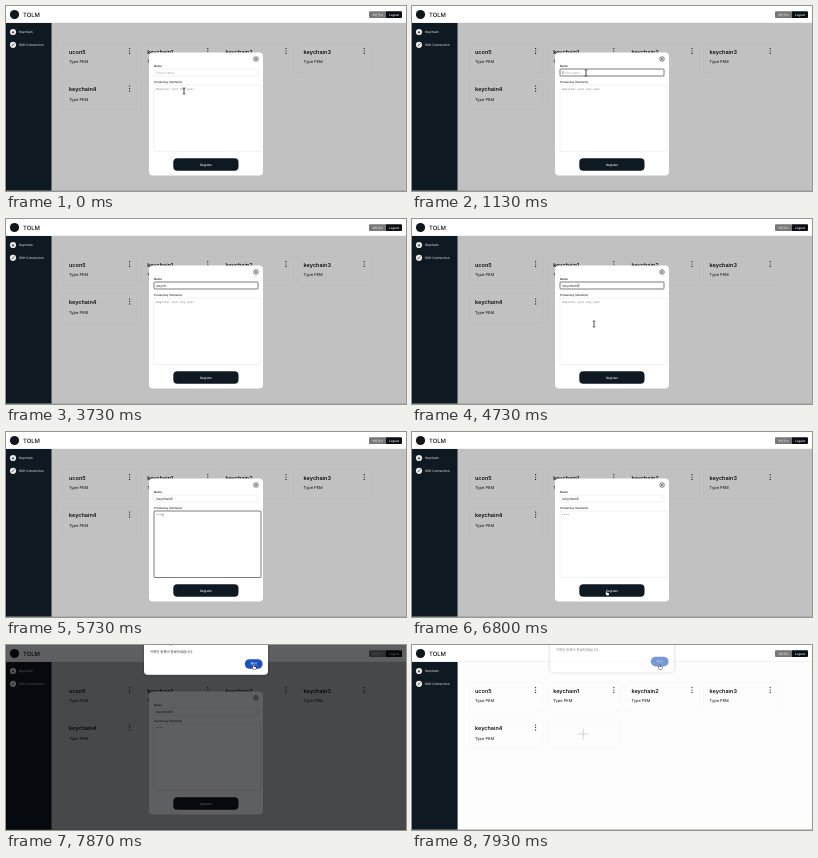
An HTML page with a canvas that plays this animation: 400 by 185 pixels, repeating every 8 s.

```html
<!DOCTYPE html>
<html lang="ko">
<head>
<meta charset="utf-8">
<title>Keychain registration</title>
<style>
  html, body { margin: 0; width: 100%; height: 100%; overflow: hidden; background: #fff; }
  canvas { display: block; width: 400px; height: 185px; }
</style>
</head>
<body>
<canvas id="stage"></canvas>
<script>
const LOOP = 8000, W = 400, H = 185;
const SANS = 'Inter, "Noto Sans CJK KR", "Noto Sans CJK", sans-serif';
const KOREAN = '"Noto Sans CJK KR", "Noto Sans CJK", sans-serif';
const MONO = '"Liberation Mono", monospace';
const NAVY = '#0f1922';

const canvas = document.getElementById('stage');
const ratio = window.devicePixelRatio || 1;
canvas.width = W * ratio;
canvas.height = H * ratio;
const ctx = canvas.getContext('2d');
ctx.scale(ratio, ratio);
ctx.textRendering = 'geometricPrecision';
ctx.textBaseline = 'middle';

const NAME = 'keychain5';
const NAME_TIMES = [1930, 2600, 3200, 3600, 3730, 3870, 4000, 4270, 4470];
const KEY_TIMES = [5470, 5560, 5640, 5730];
const NAME_FOCUS = [870, 4870], KEY_FOCUS = [4870, 6600];
const ALERT_IN = 6870, ALERT_OUT = 7930;

// Pointer moves: start, end, from, to
const MOVES = [
  [70, 870, [178, 85], [174, 67]],
  [4470, 4730, [174, 67], [182, 105]],
  [6200, 6600, [182, 105], [195, 161]],
  [6900, 7600, [195, 161], [248, 22]]
];

const within = (t, [from, to]) => t >= from && t < to;
const progress = (t, from, to) => Math.min(1, Math.max(0, (t - from) / (to - from)));
const ease = p => p * p * (3 - 2 * p);
const typed = (t, times) => times.filter(at => t >= at).length;

function rect(x, y, w, h, fill) {
  ctx.fillStyle = fill;
  ctx.fillRect(x, y, w, h);
}

function box(x, y, w, h, r, fill, stroke, width = 0.5) {
  ctx.beginPath();
  ctx.roundRect(x, y, w, h, r);
  if (fill) { ctx.fillStyle = fill; ctx.fill(); }
  if (stroke) { ctx.strokeStyle = stroke; ctx.lineWidth = width; ctx.stroke(); }
}

function circle(x, y, r, fill) {
  ctx.beginPath();
  ctx.arc(x, y, r, 0, 7);
  ctx.fillStyle = fill;
  ctx.fill();
}

function line(color, width, ...points) {
  ctx.beginPath();
  points.forEach(([x, y], i) => i ? ctx.lineTo(x, y) : ctx.moveTo(x, y));
  ctx.strokeStyle = color;
  ctx.lineWidth = width;
  ctx.stroke();
}

function text(str, x, y, size, color, { weight = 400, font = SANS, align = 'left' } = {}) {
  ctx.font = `${weight} ${size}px ${font}`;
  ctx.textAlign = align;
  ctx.fillStyle = color;
  ctx.fillText(str, x, y);
  return ctx.measureText(str).width;
}

function drawCard(title, col, row) {
  const x = 63 + col * 78.2, y = 46 + row * 37.5;
  box(x - 6, y - 8.5, 74, 29, 2, null, 'rgba(0,0,0,.03)');
  if (!title) {
    const cx = x + 30, cy = y + 5.5;
    line('#aaa', 0.5, [cx - 5.5, cy], [cx + 5.5, cy]);
    line('#aaa', 0.5, [cx, cy - 5.5], [cx, cy + 5.5]);
    return;
  }
  text(title, x, y, 5.5, '#111', { weight: 600 });
  text('Type PEM', x, y + 10, 4, '#111');
  for (const dy of [-3.4, -1, 1.4]) circle(x + 60.6, y + dy, 0.62, '#111');
}

function drawPage(modalOpen) {
  rect(0, 0, W, H, '#fdfdfd');
  ['ucon5', 'keychain1', 'keychain2', 'keychain3', 'keychain4', '']
    .forEach((title, i) => drawCard(title, i % 4, Math.floor(i / 4)));
  if (modalOpen) rect(45.6, 17, W - 45.6, H - 17, 'rgba(0,0,0,.24)');

  rect(0, 0, W, 17, '#fff');
  rect(0, 16.6, W, 0.4, '#ddd');
  circle(8.5, 8.5, 4.6, '#10161b');
  text('TOLM', 17, 8.8, 5.9, '#111', { weight: 500 });
  box(363, 5.3, 17, 6.6, [1, 0, 0, 1], '#777');
  box(380, 5.3, 16, 6.6, [0, 1, 1, 0], '#0b0f13');
  text('회원정보', 371.5, 8.6, 2.9, '#eee', { align: 'center', font: KOREAN });
  text('Logout', 388, 8.7, 3, '#fff', { align: 'center', weight: 500 });

  rect(0, 17, 45.6, H - 17, NAVY);
  ['Keychain', 'SSH Connection'].forEach((label, i) => {
    const y = 26 + i * 12.8;
    circle(7, y, 3.1, '#e8e8e8');
    if (i) line('#333', 0.8, [5.8, y + 1.2], [8.3, y - 1.3]);
    else box(5.9, y - 0.6, 2.2, 1.8, 0.3, '#555');
    text(label, 13, y, 3.2, '#f2f2f2');
  });
  rect(0, H - 0.5, W, 0.5, '#999');
}

function drawCaret(t, x, y) {
  if (t % 1060 < 530) line('#333', 0.35, [x, y - 1.8], [x, y + 1.8]);
}

function drawField(x, y, w, h, focused) {
  box(x, y, w, h, 0.8, '#fff', focused ? '#444' : '#e2e2e2', focused ? 0.7 : 0.5);
}

function drawModal(t) {
  box(143, 46.5, 114, 123, 4, '#fff');
  ctx.beginPath();
  ctx.arc(250, 53, 2.3, 0, 7);
  ctx.strokeStyle = '#222';
  ctx.lineWidth = 0.6;
  ctx.stroke();
  line('#222', 0.6, [249.1, 52.1], [250.9, 53.9]);
  line('#222', 0.6, [250.9, 52.1], [249.1, 53.9]);

  const nameFocus = within(t, NAME_FOCUS), keyFocus = within(t, KEY_FOCUS);
  const name = NAME.slice(0, typed(t, NAME_TIMES));
  text('Name', 148, 59.8, 2.8, '#111', { weight: 500 });
  drawField(148, 63, 104, 7, nameFocus);
  const nameWidth = name ? text(name, 150.5, 66.6, 3.4, '#222') : 0;
  if (!name && t < 1400) text('Enter name', 150.5, 66.6, 3.3, '#aaa');
  if (nameFocus) drawCaret(t, 150.7 + nameWidth, 66.5);

  const key = '*'.repeat(typed(t, KEY_TIMES));
  text('Private Key (Contents)', 148, 76, 2.65, '#111', { weight: 500 });
  drawField(148, 79, 107, 66.5, keyFocus);
  const keyWidth = key ? text(key, 150, 83.3, 2.9, '#222', { font: MONO }) : 0;
  if (!key) text('Register your key pair', 150, 83, 2.9, '#777', { font: MONO });
  if (keyFocus) drawCaret(t, 150 + keyWidth, 83);

  box(167.3, 152.2, 65.2, 12.6, 4, NAVY);
  text('Register', 200, 158.6, 3.05, '#fff', { align: 'center', weight: 500 });
}

// The shadow is clipped to the outside so a translucent sheet stays clean.
function drawSheet(x, y, w, h, r) {
  ctx.save();
  const outside = new Path2D();
  outside.rect(0, -H, W, 2 * H);
  outside.roundRect(x, y, w, h, r);
  ctx.clip(outside, 'evenodd');
  ctx.shadowColor = 'rgba(0,0,0,.35)';
  ctx.shadowBlur = 3 * ratio;
  box(x, y, w, h, r, '#fff');
  ctx.restore();
  box(x, y, w, h, r, '#fff');
}

function drawAlert(t) {
  const leaving = t >= ALERT_OUT;
  const shown = leaving ? 0 : ease(progress(t, ALERT_IN, 7070));
  ctx.save();
  ctx.translate(0, -2.4 * (1 - shown));
  ctx.globalAlpha = leaving ? 0.6 : 0.72 + 0.28 * shown;
  drawSheet(138, -20, 124, 49.7, 4);
  text('localhost 내용:', 144, -1.7, 3.5, '#222', { weight: 600, font: KOREAN });
  text('키체인 등록이 완료되었습니다.', 144, 6.9, 3.4, '#222', { font: KOREAN });
  box(238.8, 14.2, 17.8, 9.6, 4.8, '#1d51bd');
  text('확인', 247.7, 19, 3.6, '#fff', { align: 'center', font: KOREAN });
  ctx.restore();
}

function drawPointer(t) {
  if (within(t, [1400, 4470]) || within(t, [5470, 6200])) return;
  let [x, y] = MOVES[0][2];
  for (const [start, end, from, to] of MOVES) {
    if (t < start) break;
    const p = ease(progress(t, start, end));
    x = from[0] + (to[0] - from[0]) * p;
    y = from[1] + (to[1] - from[1]) * p;
  }
  ctx.save();
  ctx.translate(x, y);
  if (t < 6450) {
    line('#222', 0.8, [0, -2.8], [0, 2.8]);
    for (const end of [-2.9, 2.9]) line('#222', 0.7, [-1.3, end], [1.3, end]);
  } else {
    const hand = new Path2D('M-.8-2.2Q-.3-2.8 .2-2.2V-.4L2.2.2Q2.7.5 2.5 1.3L2 3H-.4L-2-.1Q-1.9-.7-1.4-.4L-.8.3Z');
    ctx.scale(0.8, 0.8);
    ctx.fillStyle = '#fff';
    ctx.strokeStyle = '#111';
    ctx.lineWidth = 1.1;
    ctx.stroke(hand);
    ctx.fill(hand);
  }
  ctx.restore();
}

function draw(t) {
  const modalOpen = t < ALERT_OUT;
  drawPage(modalOpen);
  if (modalOpen) drawModal(t);
  if (t >= ALERT_IN) {
    if (modalOpen) rect(0, 0, W, H, 'rgba(0,3,4,.63)');
    drawAlert(t);
  }
  drawPointer(t);
}

const started = performance.now();
function tick() {
  draw((performance.now() - started) % LOOP);
  requestAnimationFrame(tick);
}
tick();
</script>
</body>
</html>
```
